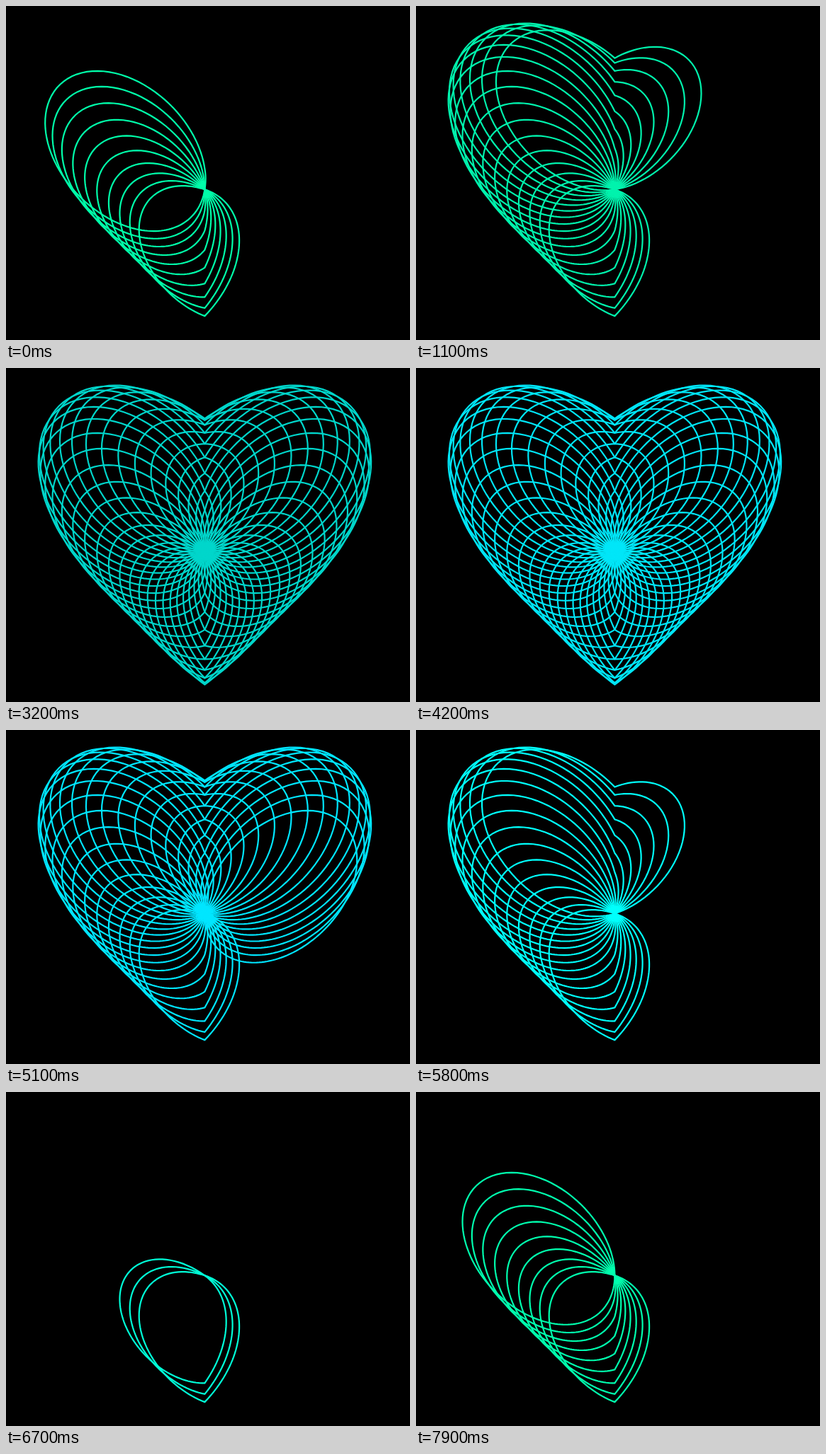
Recreate the animation shown at these times as an HTML page with a canvas. Size 570x472 px, loop 8 s.

```html
<!DOCTYPE html>
<html>
<head>
<meta charset="utf-8">
<title>Heart of loops</title>
<style>
html, body { margin: 0; width: 100%; height: 100%; overflow: hidden; background: #000; }
canvas { display: block; }
</style>
</head>
<body>
<canvas id="stage" width="570" height="472"></canvas>
<script>
const ctx = document.getElementById('stage').getContext('2d');
const DURATION = 8000, TICK = 100;
const CX = 280.4, CY = 259.3, SIZE = 188;
const RAD = Math.PI / 180;

// The heart fills up, holds, empties and starts again.
const KEYS = [
  { t: 0, count: 10, hue: 160, light: 50 },
  { t: 2300, count: 28, hue: 166, light: 45 },
  { t: 3200, count: 40, hue: 177, light: 42 },
  { t: 4400, count: 40, hue: 186, light: 50 },
  { t: 5100, count: 29, hue: 186, light: 50 },
  { t: 6900, count: 0, hue: 169, light: 50 },
  { t: 7150, count: 0, hue: 167, light: 50 },
  { t: 7900, count: 9, hue: 161, light: 50 }
];

function stateAt(t) {
  const i = KEYS.findLastIndex(key => key.t <= t);
  const a = KEYS[i], b = KEYS[i + 1] || a;
  const f = (t - a.t) / (b.t - a.t || 1);
  const mix = name => a[name] + (b[name] - a[name]) * f;
  return { count: Math.floor(mix('count')), color: `hsl(${mix('hue')} 100% ${mix('light')}%)` };
}

// Heart radius; the angle runs clockwise from straight down.
function heart(angle) {
  return SIZE / (1 + Math.SQRT1_2 * Math.abs(Math.sin(angle)) * Math.cos(angle));
}

// A circle through the centre, scaled by the heart radius.
function loop(tilt) {
  const path = new Path2D();
  for (let d = -90; d <= 90; d += 1.5) {
    const angle = (tilt + d) * RAD;
    const r = heart(angle) * Math.cos(d * RAD);
    path.lineTo(CX - r * Math.sin(angle), CY + r * Math.cos(angle));
  }
  path.closePath();
  return path;
}

const loops = Array.from({ length: 40 }, (_, i) => loop(18 + 9 * i));

function draw(now) {
  const { count, color } = stateAt(Math.floor(now % DURATION / TICK) * TICK);
  ctx.fillStyle = '#000';
  ctx.fillRect(0, 0, 570, 472);
  ctx.strokeStyle = color;
  ctx.lineWidth = 2.2;
  loops.slice(0, count).forEach(path => ctx.stroke(path));
}

const start = performance.now();
function frame() {
  draw(performance.now() - start);
  requestAnimationFrame(frame);
}
frame();
</script>
</body>
</html>
```
